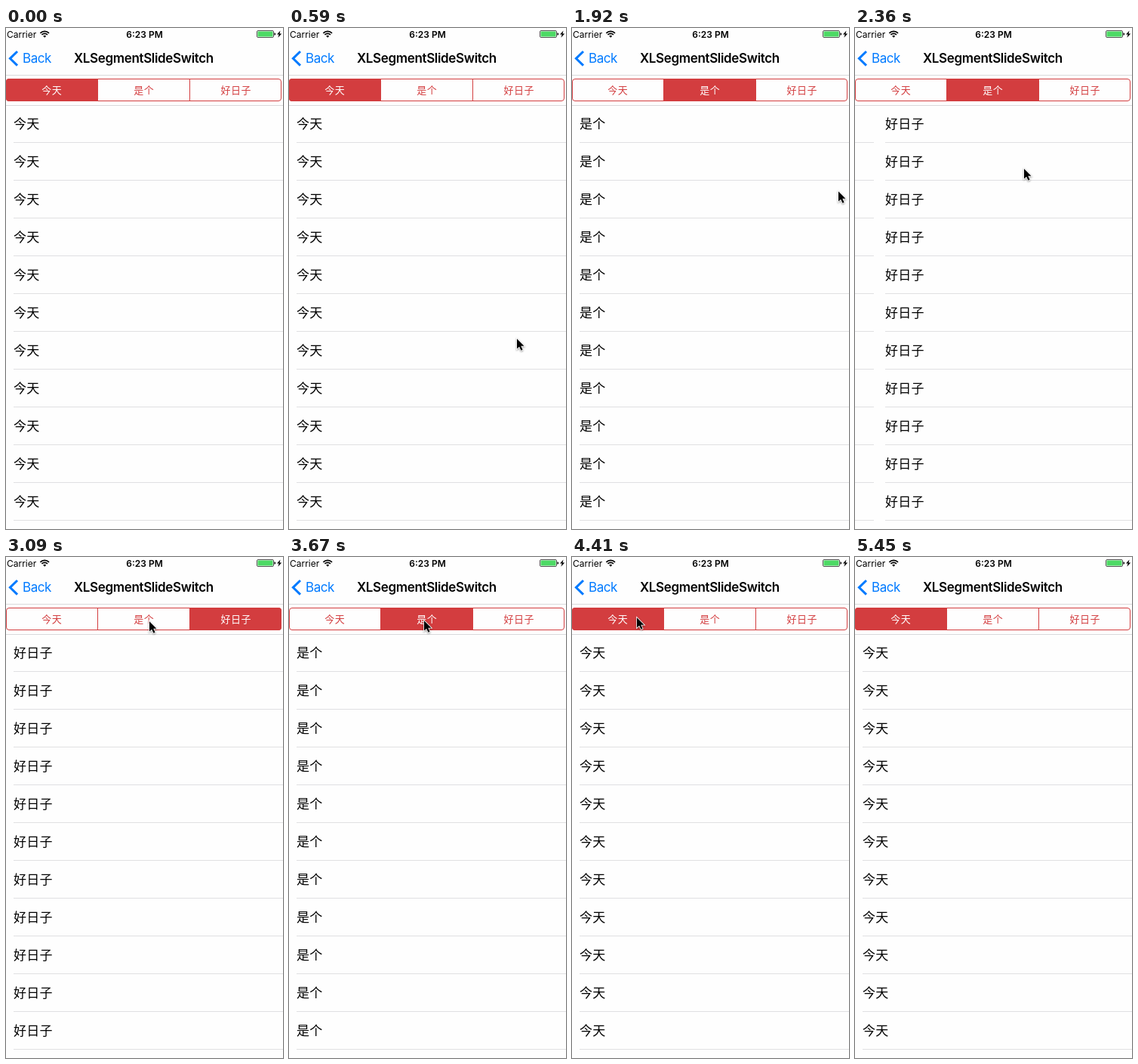
Animation of 367 by 663 pixels, one loop 5750 ms. Source, as an HTML page:

```html
<!DOCTYPE html>
<html lang="zh-CN">
<head>
<meta charset="utf-8">
<title>XLSegmentSlideSwitch</title>
<style>
  html, body { margin: 0; width: 100%; height: 100%; overflow: hidden; background: #fefefe; }
  svg { display: block; width: 367px; height: 663px; font-family: Inter, Roboto, sans-serif; }
  .cjk { font-family: "Noto Sans CJK SC", "Noto Sans CJK", sans-serif; }
  .row { font-size: 17px; letter-spacing: .2px; }
  .tab { font-size: 13px; letter-spacing: .5px; text-anchor: middle; }
  .bold { font-weight: 600; text-anchor: middle; }
  #cursor { filter: drop-shadow(0 1px 1px rgba(0, 0, 0, .4)); }
</style>
</head>
<body>
<svg viewBox="0 0 367 663">
  <defs><clipPath id="bar"><rect y="67" width="365" height="30" rx="4"/></clipPath></defs>
  <g id="pages"></g>

  <g font-size="12">
    <text x="1" y="12.8">Carrier</text>
    <text class="bold" x="183.5" y="12.8">6:23 PM</text>
  </g>
  <g fill="none" stroke="#000" stroke-width="1.7">
    <path d="M45.4 6.9a8 8 0 0 1 11.6 0M47.4 9a5.2 5.2 0 0 1 7.6 0"/>
    <path d="M51.2 12.8l-2-2.1a2.9 2.9 0 0 1 4 0z" fill="#000" stroke="none"/>
  </g>
  <rect x="332.5" y="3.5" width="22" height="9" rx="1.5" fill="#fefefe" stroke="#555"/>
  <rect x="333.5" y="4.5" width="20" height="7" rx=".5" fill="#4cd964"/>
  <path d="M355.5 6.3q1.7 0 1.7 1.7t-1.7 1.7zM363.5 3.5l-4.5 5h2.6l-1.2 4.3 4.8-5.3h-2.7z"/>

  <path d="M15 31l-9.6 9.3 9.6 9.3" fill="none" stroke="#007aff" stroke-width="3"/>
  <g font-size="17">
    <text x="22" y="46.2" fill="#007aff" letter-spacing="-.45">Back</text>
    <text class="bold" x="182.4" y="46.2" letter-spacing="-.35">XLSegmentSlideSwitch</text>
  </g>
  <path d="M0 62.5h367M0 102.5h367" stroke="#d9d9db"/>

  <rect id="chosen" y="67" height="30" fill="#d33d3f" clip-path="url(#bar)"/>
  <g fill="none" stroke="#d33d3f">
    <rect x=".5" y="67.5" width="364" height="29" rx="3.5"/>
    <path d="M121.5 67v30M243.5 67v30"/>
  </g>
  <g id="tabs"></g>

  <path id="cursor" d="M1 1.2v13.4l3.1-2.9 2.4 5.1 2.1-1-2.3-5h4.2z"
        stroke="#fff" stroke-width="1.6" paint-order="stroke"/>
</svg>
<script>
const LOOP = 5750, STEP = 147, PITCH = 375, ROWS = 11;
const labels = ['今天', '是个', '好日子'];
const $ = id => document.getElementById(id);

// Keys are [step, ...values]; values between keys are linear.
const scrollKeys = [
  [6, 0], [7, 100], [8, 189], [9, 318], [10, 367], [11, 375],
  [13, 375], [14, 447], [15, 590], [16, 720], [17, 744], [18, 750],
  [22, 750], [23, 705], [24, 470], [25, 375],
  [27, 375], [28, 330], [29, 95], [30, 0]
];
const cursorKeys = [
  [3, 340, 428], [4, 301, 410], [6, 301, 410], [8, 101, 386], [9, 80, 380],
  [11, 300, 240], [12, 300, 240], [13, 352, 215], [14, 270, 208], [15, 160, 195],
  [16, 223, 185], [18, 214, 125], [20, 203, 92], [21, 189, 84],
  [24, 189, 84], [25, 178, 83], [28, 85, 79], [30, 85, 79],
  [31, 110, 120], [34, 255, 420], [36, 330, 650]
];
// Selected tab from each step onward.
const tabKeys = [[0, 0], [11, 1], [18, 2], [23, 1], [28, 0]];

function sample(keys, step) {
  const next = keys.findIndex(key => key[0] >= step);
  if (next < 0) return keys[keys.length - 1].slice(1);
  if (next === 0) return keys[0].slice(1);
  const a = keys[next - 1], b = keys[next];
  const p = (step - a[0]) / (b[0] - a[0]);
  return a.slice(1).map((v, i) => v + (b[i + 1] - v) * p);
}

$('pages').innerHTML = labels.map((label, page) => {
  let rows = '';
  for (let i = 0; i < ROWS; i++) {
    const y = 102 + i * 50;
    rows += `<text class="cjk row" x="15" y="${y + 31}">${label}</text>` +
      `<path d="M15 ${y + 49.5}H${PITCH}" stroke="#e0e0e2"/>`;
  }
  return `<g transform="translate(${page * PITCH - 5})">${rows}</g>`;
}).join('');

$('tabs').innerHTML = labels.map((label, i) =>
  `<text class="cjk tab" x="${60.7 + i * 122}" y="87">${label}</text>`).join('');

function draw(now) {
  const step = Math.floor((now % LOOP + 6) / STEP);
  const selected = tabKeys.filter(key => key[0] <= step).pop()[1];
  $('pages').setAttribute('transform', `translate(${-sample(scrollKeys, step)[0]})`);
  $('chosen').setAttribute('x', [0, 121, 243][selected]);
  $('chosen').setAttribute('width', [122, 123, 122][selected]);
  [...$('tabs').children].forEach((tab, i) =>
    tab.setAttribute('fill', i === selected ? '#fff' : '#d33d3f'));
  $('cursor').setAttribute('transform', `translate(${sample(cursorKeys, step)})`);
  $('cursor').style.display = step >= 3 && step < 37 ? '' : 'none';
  requestAnimationFrame(draw);
}
draw(performance.now());
</script>
</body>
</html>
```
